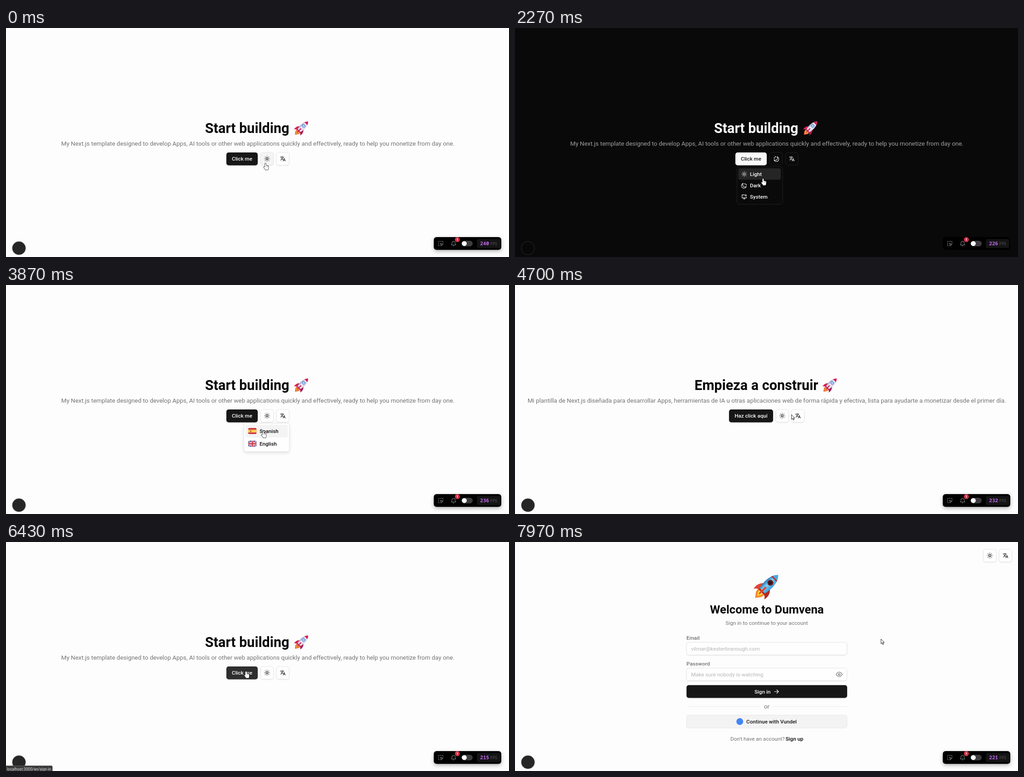
Recreate the animation shown at these times as an HTML page with a canvas. Size 1107 by 506 pixels, loop 8000 ms.

```html
<!DOCTYPE html>
<html lang="en">
<head>
<meta charset="utf-8">
<title>Template demo</title>
<style>
html, body { margin: 0; width: 100%; height: 100%; overflow: hidden; background: #fdfdfd; }
canvas { display: block; width: 100vw; height: 100vh; }
</style>
</head>
<body>
<canvas id="stage"></canvas>
<script>
const W = 1107, H = 506, LOOP = 8000;
const canvas = document.getElementById('stage');
const ctx = canvas.getContext('2d');
const SANS = 'Roboto, "Open Sans", sans-serif';
const MONO = '"Noto Sans Mono", "DejaVu Sans Mono", monospace';

const LIGHT = {
  bg: '#fdfdfd', fg: '#0a0a0a', muted: '#737373', primary: '#171717', primaryHover: '#2e2e2e',
  onPrimary: '#fafafa', border: '#e8e8ee', card: '#fefefe', accent: '#f4f4f4', shadow: 'rgba(0,0,0,.12)'
};
const DARK = {
  bg: '#09090a', fg: '#fafafa', muted: '#a1a1a1', primary: '#fafafa', primaryHover: '#e2e2e2',
  onPrimary: '#171717', border: '#202022', card: '#0a0a0b', accent: '#252525', shadow: 'rgba(0,0,0,0)'
};

const EN = {
  title: 'Start building', titleX: 438, rocketX: 650.5,
  lead: 'My Next.js template designed to develop Apps, AI tools or other web applications quickly and effectively, ready to help you monetize from day one.',
  cta: 'Click me', ctaX: 485, ctaW: 69, shift: 0, langs: ['Spanish', 'English']
};
const ES = {
  title: 'Empieza a construir', titleX: 395, rocketX: 693.5,
  lead: 'Mi plantilla de Next.js diseñada para desarrollar Apps, herramientas de IA u otras aplicaciones web de forma rápida y efectiva, lista para ayudarte a monetizar desde el primer día.',
  cta: 'Haz click aquí', ctaX: 471, ctaW: 97, shift: 13.5, langs: ['Español', 'Inglés']
};

const ICONS = {
  sun: 'M12 8a4 4 0 1 0 0 8a4 4 0 1 0 0-8M12 2v1.5M12 20.5v1.5M2 12h1.5M20.5 12h1.5M4.9 4.9l1 1M18.1 18.1l1 1M4.9 19.1l1-1M18.1 5.9l1-1',
  moon: 'M20 15.5A9.5 9.5 0 1 1 8.5 4A7.6 7.6 0 0 0 20 15.5ZM15 4v3M13.5 5.5h3M20 8v3M18.5 9.5h3',
  system: 'M13 4H3.5v12h17V12M9 20h6M12 16v4M20.5 6a2.5 2.5 0 1 1-5 0a2.5 2.5 0 1 1 5 0',
  eye: 'M1.5 12q10.5-15 21 0q-10.5 15-21 0M12 9a3 3 0 1 0 0 6a3 3 0 1 0 0-6',
  arrow: 'M5 12h14M13 6l6 6l-6 6',
  bell: 'M6 9a6 6 0 0 1 12 0c0 6 2 7 3 8H3c1-1 3-2 3-8M10.5 21h3',
  select: 'M3 5V3h2M9 3h2M14 3h2M19 3h2v2M3 9v2M3 14v2M3 19v2h2M9 21h2M21 9v2M11 11l10 4l-4 1.8l-2 4.2Z',
  translate: 'M12.87 15.07l-2.54-2.51.03-.03c1.74-1.94 2.98-4.17 3.71-6.53H17V4h-7V2H8v2H1v1.99h11.17C11.5 7.92 10.44 9.75 9 11.35 8.07 10.32 7.3 9.19 6.69 8h-2c.73 1.63 1.73 3.17 2.98 4.56l-5.09 5.02L4 19l5-5 3.11 3.11.76-2.04zM18.5 10h-2L12 22h2l1.12-3h4.75L21 22h2l-4.5-12zm-2.62 7l1.62-4.33L19.12 17h-3.24z'
};
for (const k in ICONS) ICONS[k] = new Path2D(ICONS[k]);
const HAND = new Path2D('M-1.3 8.4V1.2a1.25 1.25 0 0 1 2.5 0V5.6q0-1 .95-1t.95 1q0-.6.9-.6t.9 1q0-.5.85-.5t.85 1V10.5q0 2-1.2 4H0q-.8-2-3.5-5q-.9-1.3.2-1.8q1-.3 2 .7Z');
const ARROW = new Path2D('M0 0V10.2L2.4 8L4 11.8L5.6 11.1L4 7.4H7.2Z');

// Timeline in ms
const DARK_ON = [870, 2560];
const SPANISH_ON = [4350, 5880];
const THEME_MENU = [[330, 930], [1840, 2560]];
const LANG_MENU = [[3000, 4120], [5070, 5720]];
const HANDS = [[0, 330], [610, 1130], [1440, 1840], [2080, 2640], [2840, 3000], [3600, 4220], [5270, 5790], [6190, 6800]];
const SIGN_IN = 6800, TIP_ON = 6320;
const PATH = [
  [0, 571, 299], [200, 574, 292], [430, 574, 292], [820, 546, 351], [1000, 546, 351],
  [1600, 574, 291], [1880, 574, 291], [2260, 546, 333], [2600, 546, 333],
  [2960, 608, 291.5], [3400, 608, 291.5], [3800, 566, 323], [4160, 566, 323],
  [4640, 608.5, 286.5], [5090, 608.5, 286.5], [5470, 596, 350], [5740, 596, 350],
  [6380, 528.5, 286], [6620, 528.5, 286], [7430, 781, 214.5], [7920, 781, 214.5], [7970, 805.5, 214.5]
];
const FPS = [
  [0, 240], [160, 236], [400, 233], [640, 228], [880, 230], [1110, 224], [1350, 229], [1600, 231],
  [1850, 228], [2100, 226], [2600, 231], [2850, 235], [3400, 233], [3700, 236], [4000, 234],
  [4250, 232], [5700, 229], [5950, 224], [6200, 219], [6400, 215], [6650, 208], [6900, 214], [7150, 221]
];

const clamp = v => Math.max(0, Math.min(1, v));
const ease = v => v * v * (3 - 2 * v);
const within = (t, [a, b]) => t >= a && t < b;

function cursorAt(t) {
  let i = 0;
  while (i < PATH.length - 1 && PATH[i + 1][0] <= t) i++;
  const a = PATH[i], b = PATH[i + 1] || a;
  const k = b === a ? 0 : ease((t - a[0]) / (b[0] - a[0]));
  return { x: a[1] + (b[1] - a[1]) * k, y: a[2] + (b[2] - a[2]) * k };
}

function menuAlpha(t, spans) {
  return Math.max(...spans.map(([a, b]) => Math.min(clamp((t - a) / 130), 1 - clamp((t - b) / 140))));
}

function text(s, x, y, size, color, weight = 400, align = 'left', family = SANS) {
  ctx.font = `${weight} ${size}px ${family}`;
  ctx.textAlign = align;
  ctx.fillStyle = color;
  ctx.fillText(s, x, y);
}

function box(x, y, w, h, r, fill, stroke, shadow, blur = 3, drop = 1) {
  ctx.save();
  ctx.beginPath();
  ctx.roundRect(x, y, w, h, r);
  if (shadow) {
    ctx.shadowColor = shadow;
    ctx.shadowBlur = blur * canvas.width / W;
    ctx.shadowOffsetY = drop * canvas.height / H;
  }
  ctx.fillStyle = fill;
  ctx.fill();
  ctx.shadowColor = 'transparent';
  if (stroke) {
    ctx.lineWidth = 1;
    ctx.strokeStyle = stroke;
    ctx.stroke();
  }
  ctx.restore();
}

function disc(x, y, r, fill) {
  ctx.beginPath();
  ctx.arc(x, y, r, 0, 7);
  ctx.fillStyle = fill;
  ctx.fill();
}

function icon(name, x, y, size, color, { width = 1.1, turn = 0, solid = false } = {}) {
  const k = size / 24;
  ctx.save();
  ctx.translate(x, y);
  ctx.rotate(turn);
  ctx.scale(k, k);
  ctx.translate(-12, -12);
  ctx.lineCap = ctx.lineJoin = 'round';
  ctx.lineWidth = width / k;
  ctx.fillStyle = ctx.strokeStyle = color;
  if (solid) ctx.fill(ICONS[name]); else ctx.stroke(ICONS[name]);
  ctx.restore();
}

function shape(d, fill) {
  ctx.fillStyle = fill;
  ctx.fill(new Path2D(d));
}

const PINK = { body: ['#a9a3c4', '#f4eef8', '#d9cfe3'], trim: '#d81f55', trimDark: '#a81a50', ring: '#5d8fd8', glass: '#a9d4fb', flame: ['#f9a53a', '#e8743a'] };
const BLUE = { body: ['#2676b8', '#7cd0f6', '#3d9bdc'], trim: '#e2452f', trimDark: '#b32a20', ring: '#7d2222', glass: '#241a20', flame: ['#ffd83c', '#f5862a'] };

function rocket(x, y, size, c) {
  ctx.save();
  ctx.translate(x, y);
  ctx.rotate(Math.PI / 4);
  ctx.scale(size / 30, size / 30);
  shape('M-4.5 9C-7 14-3 16 0 21C3 16 7 14 4.5 9Z', c.flame[1]);
  shape('M-2.6 9C-4 13-1.5 14 0 17.5C1.5 14 4 13 2.6 9Z', c.flame[0]);
  shape('M-4.5-1C-10 3-11 9-9.5 14C-8 11-6 10-3.5 10Z', c.trim);
  shape('M4.5-1C10 3 11 9 9.5 14C8 11 6 10 3.5 10Z', c.trimDark);
  const hull = new Path2D('M0-20.5C7-14 7.5-1 4.2 10H-4.2C-7.5-1-7-14 0-20.5Z');
  const g = ctx.createLinearGradient(-6, 0, 6, 0);
  c.body.forEach((col, i) => g.addColorStop([0, .4, 1][i], col));
  ctx.fillStyle = g;
  ctx.fill(hull);
  ctx.save();
  ctx.clip(hull);
  ctx.fillStyle = c === PINK ? c.trim : '#4aa9e6';
  ctx.fillRect(-9, -22, 18, 8.5);
  ctx.fillStyle = c.trimDark;
  if (c === BLUE) ctx.fillRect(-9, -14.5, 18, 1.6);
  ctx.fillRect(-9, 8, 18, 3);
  ctx.restore();
  disc(0, -6.5, 3.8, c.ring);
  disc(0, -6.5, 2.5, c.glass);
  shape('M-1.2 2Q0 0 1.2 2L1 13Q0 15-1 13Z', c.trim);
  ctx.restore();
}

function line(x1, y1, x2, y2, color, w) {
  ctx.beginPath();
  ctx.moveTo(x1, y1);
  ctx.lineTo(x2, y2);
  ctx.strokeStyle = color;
  ctx.lineWidth = w;
  ctx.stroke();
}

function flag(kind, x, y) {
  const w = 18.5, h = 13.5;
  ctx.save();
  ctx.translate(x, y);
  ctx.beginPath();
  ctx.roundRect(0, 0, w, h, 3);
  ctx.clip();
  if (kind === 0) {
    ctx.fillStyle = '#cf2f45';
    ctx.fillRect(0, 0, w, h);
    ctx.fillStyle = '#fbce4b';
    ctx.fillRect(0, 3.6, w, 6.3);
    ctx.fillStyle = '#b8733f';
    ctx.fillRect(4, 5, 3, 3.6);
  } else {
    ctx.fillStyle = '#2c4380';
    ctx.fillRect(0, 0, w, h);
    for (const [col, dw] of [['#f2f2f4', 2.6], ['#cf2f45', 1]]) {
      line(0, 0, w, h, col, dw);
      line(0, h, w, 0, col, dw);
    }
    for (const [col, dw] of [['#f2f2f4', 4.4], ['#cf2f45', 2.4]]) {
      line(w / 2, 0, w / 2, h, col, dw);
      line(0, h / 2, w, h / 2, col, dw);
    }
  }
  ctx.restore();
}

function iconButton(x, y, th, hover, draw) {
  box(x + .5, y + .5, 28, 28, 5, hover ? th.accent : th.card, th.border, th.shadow);
  draw(x + 14.5, y + 14.5);
}

function themeIcon(th) {
  return (x, y) => th === DARK
    ? icon('moon', x, y, 13.5, th.fg, { turn: -Math.PI / 2 })
    : icon('sun', x, y, 14, th.fg);
}

function langIcon(th) {
  return (x, y) => icon('translate', x, y, 13, th.fg, { solid: true });
}

function popover(x, y, w, h, th) {
  box(x, y, w, h, 5, th.card, th.border, th.shadow, 7, 3);
}

function themeMenu(alpha, th, at, dx) {
  if (alpha <= 0) return;
  ctx.save();
  ctx.globalAlpha *= alpha;
  ctx.translate(dx, 0);
  popover(488.5, 306.5, 100.5, 83, th);
  [['sun', 'Light'], ['moon', 'Dark'], ['system', 'System']].forEach(([name, label], i) => {
    const y = 310 + i * 25.2;
    if (at.x > 488 && at.x < 589 && at.y >= y && at.y < y + 25.2) box(491.5, y, 93.5, 25.2, 4, th.accent);
    icon(name, 504.5, y + 12.7, 13.5, th.fg);
    text(label, 517, y + 16.8, 11.6, th.fg, 500);
  });
  ctx.restore();
}

function langMenu(alpha, th, at, lang) {
  if (alpha <= 0) return;
  const dx = lang.shift;
  ctx.save();
  ctx.globalAlpha *= alpha;
  ctx.translate(dx, 0);
  popover(523.5, 305.5, 100, 62.5, th);
  lang.langs.forEach((label, i) => {
    const y = 309 + i * 28;
    if (at.x > 523 + dx && at.x < 623 + dx && at.y >= y && at.y < y + 28) box(527, y, 93, 28, 4, th.accent);
    flag(i, 533, y + 7);
    text(label, 558, y + 18.2, 11.6, th.fg, 500);
  });
  ctx.restore();
}

function home(t, th, at) {
  const lang = within(t, SPANISH_ON) ? ES : EN;
  const themeA = menuAlpha(t, THEME_MENU), langA = menuAlpha(t, LANG_MENU);
  const idle = themeA <= 0 && langA <= 0;
  const over = (x, w) => idle && at.y > 275 && at.y < 303 && at.x >= x && at.x < x + w;
  text(lang.title, lang.titleX, 231.5, 30.5, th.fg, 600);
  rocket(lang.rocketX, 221, 30, PINK);
  text(lang.lead, 554.3, 260, 13.4, th.muted, 400, 'center');
  box(lang.ctaX, 275, lang.ctaW, 28.5, 5, over(lang.ctaX, lang.ctaW) ? th.primaryHover : th.primary, null, th.shadow);
  text(lang.cta, lang.ctaX + lang.ctaW / 2, 293.3, 11.6, th.onPrimary, 500, 'center');
  const x = 560 + lang.shift;
  iconButton(x, 274.5, th, over(x, 28), themeIcon(th));
  iconButton(x + 34.7, 274.5, th, over(x + 35.5, 28) && t < 4200, langIcon(th));
  themeMenu(themeA, th, at, lang.shift);
  langMenu(langA, th, at, lang);
}

function signIn(t, th) {
  ctx.save();
  ctx.globalAlpha = clamp((t - SIGN_IN) / 200);
  iconButton(1030.5, 15.5, th, false, themeIcon(th));
  iconButton(1065, 15.5, th, false, langIcon(th));
  const rise = 1 - ease(clamp((t - SIGN_IN) / 630));
  rocket(554 - 6 * rise, 98 + 6 * rise, 52, BLUE);
  text('Welcome to Dumvena', 554.3, 158.3, 25.7, th.fg, 700, 'center');
  text('Sign in to continue to your account', 554, 183, 11.8, th.muted, 400, 'center');
  const field = (label, hint, y) => {
    text(label, 377.3, y - 5.3, 11.7, th.muted, 500);
    box(377.5, y + .5, 353, 28, 5, th.card, '#e4e4e4', th.shadow, 2);
    text(hint, 387.5, y + 18.6, 11.8, '#b5b5b5');
  };
  field('Email', 'vilmar@kesterbranough.com', 221);
  field('Password', 'Make sure nobody is watching', 278);
  icon('eye', 713.5, 292.5, 16, '#666', { width: 1.2 });
  box(377.5, 316.3, 353.5, 28.2, 5, th.primary, null, th.shadow);
  text('Sign in', 527, 334.5, 11.7, th.onPrimary, 500);
  icon('arrow', 575.5, 330.5, 15, th.onPrimary, { width: 1.2 });
  line(378, 363.5, 540, 363.5, '#ebebeb', 1);
  line(567, 363.5, 731, 363.5, '#ebebeb', 1);
  text('or', 554, 367.7, 13.4, th.muted, 400, 'center');
  box(377.5, 382.5, 353, 28.5, 5, '#f3f3f3', '#e6e6e6');
  disc(494.7, 396.7, 7.5, '#4285f4');
  text('Continue with Vundel', 509, 400.6, 11.7, th.primary, 500);
  text("Don't have an account?", 474, 438.6, 11.7, th.muted);
  text('Sign up', 595.5, 438.6, 11.7, th.fg, 500);
  ctx.restore();
}

function devBadge(th) {
  disc(28.5, 486.5, 15, th === DARK ? '#2c2c2c' : '#5a5a5a');
  disc(28.5, 486.5, 14, th === DARK ? '#080808' : '#262626');
}

function toolbar(t, th) {
  box(941.5, 462, 148.5, 28.3, 6, '#000', null, th === DARK ? null : 'rgba(0,0,0,.3)', 9, 3);
  icon('select', 957, 476.3, 13, '#a8a8a8', { width: .9 });
  icon('bell', 985, 476.5, 14, '#a8a8a8', { width: .9 });
  disc(993.3, 467.5, 5.5, '#cf3045');
  text('1', 993.3, 470, 7, '#fff', 700, 'center');
  box(1002.5, 470, 24.5, 12.6, 6.3, '#3d3d40');
  disc(1008.6, 476.3, 5.4, '#fff');
  box(1036.5, 466.5, 51, 19.5, 4, '#141414');
  const fps = FPS.filter(([at]) => at <= t).pop()[1];
  text(fps, 1043.3, 480.2, 11, '#c266f2', 700, 'left', MONO);
  text('FPS', 1066, 479.7, 8.3, '#5a5a5a', 400, 'left', MONO);
}

function statusTip() {
  box(-3, 494.5, 105, 15, 2, '#3b3b3c', '#5a5a5a');
  text('localhost:3000/en/sign-in', 2, 505, 8.5, '#dedede');
}

function cursor(t, at) {
  const hand = HANDS.some(s => within(t, s));
  ctx.save();
  ctx.translate(at.x, at.y);
  ctx.lineJoin = 'round';
  ctx.lineWidth = hand ? 1.3 : 1;
  ctx.strokeStyle = '#141414';
  ctx.fillStyle = '#fff';
  const p = hand ? HAND : ARROW;
  ctx.stroke(p);
  ctx.fill(p);
  if (hand) {
    for (const x of [1.4, 3.3, 5]) line(x, 6.2, x, 8.4, 'rgba(20,20,20,.6)', .6);
  } else {
    ctx.lineWidth = .7;
    ctx.stroke(p);
  }
  ctx.restore();
}

function render(t) {
  const w = Math.round(innerWidth * devicePixelRatio), h = Math.round(innerHeight * devicePixelRatio);
  if (canvas.width !== w || canvas.height !== h) {
    canvas.width = w;
    canvas.height = h;
  }
  ctx.setTransform(w / W, 0, 0, h / H, 0, 0);
  const th = within(t, DARK_ON) ? DARK : LIGHT;
  const at = cursorAt(t);
  ctx.fillStyle = th.bg;
  ctx.fillRect(0, 0, W, H);
  if (t < SIGN_IN) home(t, th, at); else signIn(t, th);
  devBadge(th);
  toolbar(t, th);
  if (t >= TIP_ON && t < SIGN_IN) statusTip();
  cursor(t, at);
}

const start = performance.now();
function tick() {
  render((performance.now() - start) % LOOP);
  requestAnimationFrame(tick);
}
tick();
</script>
</body>
</html>
```
